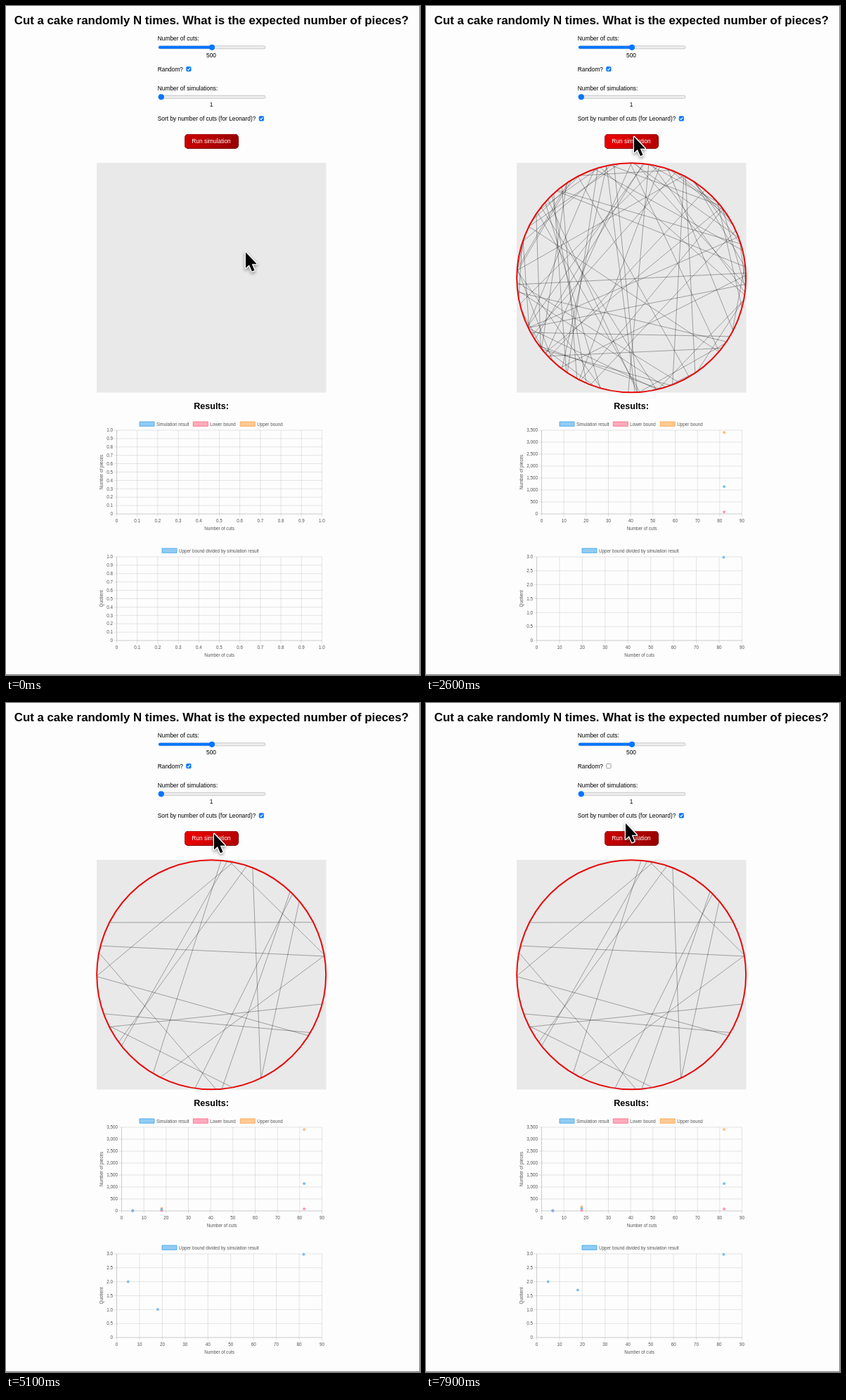
These frames come from a looping animation (589x951 px, 8 s). An HTML page with a canvas:

```html
<!DOCTYPE html>
<html lang="en">
<head>
<meta charset="utf-8">
<title>Cake cutting simulation</title>
<style>
html, body { margin: 0; width: 100%; height: 100%; overflow: hidden; background: #fdfdfd; }
canvas { display: block; }
</style>
</head>
<body>
<canvas id="stage" width="589" height="951"></canvas>
<script>
const ctx = document.getElementById('stage').getContext('2d');
const LOOP = 8000, STEP = 100;
const SANS = '"Liberation Sans", Arial, sans-serif';
const BLUE = '#0075ff';
const CAKE = { x: 292.2, y: 386.3, r: 163 };
const SERIES = {
  result: { label: 'Simulation result', line: '#36a2eb', fill: '#92ccf4' },
  lower: { label: 'Lower bound', line: '#ff6384', fill: '#ffabbc' },
  upper: { label: 'Upper bound', line: '#ff9f40', fill: '#ffca94' }
};

// Small cakes name the rim angles of their cuts in degrees; the large one is random.
const RUNS = [
  { at: 1300, cuts: 82, pieces: 1142 },
  { at: 3415, cuts: 5, pieces: 8,
    rim: '245.8-199.1 256.1-144.1 292.2-89.4 297.2-52.9 163.7-59.7' },
  { at: 4900, cuts: 18, pieces: 101,
    rim: '207.1-332.8 194.6-350.7 179.1-32.1 160.1-30.3 152.9-14.8 179.4-281 ' +
      '274.9-120.6 278-141.6 288.1-144 279.1-350 291.1-64.4 313.4-84.8 ' +
      '320.1-64.2 315.1-98.2 350.4-116.5 191.1-87.6 153.6-79.4' }
];

const REST = { x: 341, y: 350 };
const MOVES = [
  { from: 200, to: 1000, x: 296, y: 186 },
  { from: 5800, to: 6800, x: 257, y: 89 },
  { from: 7300, to: 7900, x: 284, y: 171 }
];

const clamp = v => Math.max(0, Math.min(1, v));
const smooth = p => p * p * (3 - 2 * p);
const outQuart = p => 1 - (1 - p) ** 4;

function random(seed) {
  return () => (seed = (seed * 16807) % 2147483647) / 2147483647;
}

function rimPoint(degrees) {
  const a = degrees * Math.PI / 180;
  return [CAKE.x + CAKE.r * Math.cos(a), CAKE.y + CAKE.r * Math.sin(a)];
}

const rnd = random(90210);
for (const run of RUNS) {
  const pairs = run.rim
    ? run.rim.split(' ').map(pair => pair.split('-'))
    : Array.from({ length: run.cuts }, () => [rnd() * 360, rnd() * 360]);
  run.chords = pairs.map(pair => pair.map(rimPoint));
}

function text(str, x, y, size, { align = 'left', color = '#000', bold = false } = {}) {
  ctx.font = `${bold ? 'bold ' : ''}${size}px ${SANS}`;
  ctx.textAlign = align;
  ctx.fillStyle = color;
  ctx.fillText(str, x, y);
}

function box(x, y, w, h, r, fill, stroke, width = 0.7) {
  ctx.beginPath();
  ctx.roundRect(x, y, w, h, r);
  ctx.fillStyle = fill;
  ctx.fill();
  if (!stroke) return;
  ctx.strokeStyle = stroke;
  ctx.lineWidth = width;
  ctx.stroke();
}

function line(x1, y1, x2, y2) {
  ctx.beginPath();
  ctx.moveTo(x1, y1);
  ctx.lineTo(x2, y2);
  ctx.stroke();
}

function disc(x, y, r, fill, stroke, width) {
  ctx.beginPath();
  ctx.arc(x, y, r, 0, 2 * Math.PI);
  if (fill) {
    ctx.fillStyle = fill;
    ctx.fill();
  }
  if (stroke) {
    ctx.strokeStyle = stroke;
    ctx.lineWidth = width;
    ctx.stroke();
  }
}

function slider(y, thumb) {
  box(217, y - 2, 152, 4, 2, '#efefef', '#b2b2b2');
  box(217, y - 2, thumb - 217, 4, 2, BLUE);
  disc(thumb, y, 4.1, BLUE);
}

function checkbox(x, y, checked) {
  box(x, y, 6.4, 6.4, 1.2, checked ? BLUE : '#fff', checked ? BLUE : '#767676');
  if (!checked) return;
  ctx.strokeStyle = '#fff';
  ctx.lineWidth = 1.1;
  ctx.beginPath();
  ctx.moveTo(x + 1.3, y + 3.4);
  ctx.lineTo(x + 2.7, y + 4.8);
  ctx.lineTo(x + 5.2, y + 1.5);
  ctx.stroke();
}

function button(hover, pressed) {
  const [from, to] = pressed ? ['#ee0000', '#dc0000'] : hover ? ['#f00000', '#b40000'] : ['#cc0000', '#960000'];
  const fill = ctx.createLinearGradient(254, 182, 331, 203);
  fill.addColorStop(0, from);
  fill.addColorStop(1, to);
  box(254.5, 182.5, 76, 20, 4.5, fill, '#7d0000', 1.1);
  ctx.strokeStyle = 'rgba(255,110,100,.55)';
  ctx.lineWidth = 0.7;
  line(258, 182.6, 327, 182.6);
  line(254.6, 186, 254.6, 199);
  text('Run simulation', 292, 195, 8.4, { align: 'center', color: '#fff' });
}

function drawControls(t, hover) {
  const pressed = hover && RUNS.some(run => t >= run.at - 110 && t < run.at);
  text('Cut a cake randomly N times. What is the expected number of pieces?',
    292.3, 26, 16.83, { align: 'center', bold: true });
  text('Number of cuts:', 215.7, 49, 8.4);
  slider(58.8, 293);
  text('500', 292, 73, 8.4, { align: 'center' });
  text('Random?', 215.7, 93, 8.4);
  checkbox(256.7, 86.4, t < 7000);
  text('Number of simulations:', 215.7, 119.5, 8.4);
  slider(129.3, 220.8);
  text('1', 292, 143.2, 8.4, { align: 'center' });
  text('Sort by number of cuts (for Leonard)?', 215.7, 163.2, 8.4);
  checkbox(360.2, 156.8, true);
  button(hover, pressed);
}

function drawCake(run) {
  ctx.fillStyle = '#e9e9e9';
  ctx.fillRect(129, 223, 326.5, 326.5);
  if (!run) return;
  ctx.strokeStyle = 'rgba(0,0,0,.55)';
  ctx.lineWidth = 0.6;
  for (const [a, b] of run.chords) line(...a, ...b);
  disc(CAKE.x, CAKE.y, CAKE.r, null, '#e60a0a', 2);
}

function legend(x, y, { label, line: stroke, fill }) {
  box(x, y, 21, 6.3, 0, fill, stroke, 0.8);
  text(label, x + 24, y + 5.5, 6.31, { color: '#555' });
}

// points: [x value, y value, series], given in drawing order
function chart({ left, top, yTitle, yMax, yStep, yText, xMax, xStep, xText, points }) {
  const right = 449.5, bottom = top + 119;
  const px = v => left + v / xMax * (right - left);
  const py = v => bottom - v / yMax * (bottom - top);
  const label = { color: '#555' };
  ctx.strokeStyle = 'rgba(0,0,0,.1)';
  ctx.lineWidth = 1;
  for (let i = 0; i <= Math.round(xMax / xStep); i++) {
    const x = px(i * xStep);
    line(x, top, x, bottom + 4);
    text(i ? xText(i * xStep) : '0', x, bottom + 11.5, 6.31, { ...label, align: 'center' });
  }
  for (let i = 0; i <= Math.round(yMax / yStep); i++) {
    const y = py(i * yStep);
    line(left - 4, y, right, y);
    text(i ? yText(i * yStep) : '0', left - 5.5, y + 2.2, 6.31, { ...label, align: 'right' });
  }
  line(left, top, left, bottom);
  line(left, bottom, right, bottom);
  text('Number of cuts', (left + right) / 2, bottom + 23, 6.31, { ...label, align: 'center' });
  ctx.save();
  ctx.translate(138, (top + bottom) / 2);
  ctx.rotate(-Math.PI / 2);
  text(yTitle, 0, 0, 6.31, { ...label, align: 'center' });
  ctx.restore();
  for (const [x, y, s] of points) disc(px(x), py(y), 1.45, s.fill, s.line, 0.7);
}

function drawCharts(t, runs) {
  const { result, lower, upper } = SERIES;
  const has = runs.length > 0;
  const decimal = v => v.toFixed(1);
  const whole = v => v.toLocaleString('en-US');
  const xAxis = has ? { xMax: 90, xStep: 10, xText: whole } : { xMax: 1, xStep: 0.1, xText: decimal };
  const unit = { yMax: 1, yStep: 0.1, yText: decimal };
  const grown = runs.map(({ at, cuts: n, pieces }) => {
    const k = outQuart(clamp((t - at) / 1000));
    const most = (n * n + n + 2) / 2;
    return { n, low: (n + 1) * k, mid: pieces * k, high: most * k, ratio: most / pieces * k };
  });

  text('Results:', 292, 572.7, 12.6, { align: 'center', bold: true });
  legend(190, 591, result);
  legend(266.3, 591, lower);
  legend(333.3, 591, upper);
  chart({
    left: has ? 164.5 : 157.5, top: 603, yTitle: 'Number of pieces', ...xAxis,
    ...(has ? { yMax: 3500, yStep: 500, yText: whole } : unit),
    points: [
      ...grown.map(g => [g.n, g.high, upper]),
      ...grown.map(g => [g.n, g.low, lower]),
      ...grown.map(g => [g.n, g.mid, result])
    ]
  });
  legend(222, 771, { ...result, label: 'Upper bound divided by simulation result' });
  chart({
    left: 157.5, top: 783, yTitle: 'Quotient', ...xAxis,
    ...(has ? { yMax: 3, yStep: 0.5, yText: decimal } : unit),
    points: grown.map(g => [g.n, g.ratio, result])
  });
}

function pointerAt(t) {
  let { x, y } = REST;
  for (const move of MOVES) {
    const k = smooth(clamp((t - move.from) / (move.to - move.from)));
    x += (move.x - x) * k;
    y += (move.y - y) * k;
  }
  return [x, y];
}

function drawPointer(x, y) {
  const arrow = new Path2D('M0 0V22.5L5 18L9 27.3L12.6 25.8L8.7 16.7H15.8Z');
  ctx.save();
  ctx.translate(x, y);
  ctx.lineJoin = 'round';
  ctx.lineWidth = 2.6;
  ctx.strokeStyle = '#fff';
  ctx.shadowColor = 'rgba(0,0,0,.45)';
  ctx.shadowBlur = 4;
  ctx.shadowOffsetY = 2;
  ctx.stroke(arrow);
  ctx.shadowColor = 'transparent';
  ctx.fillStyle = '#000';
  ctx.fill(arrow);
  ctx.restore();
}

function draw(now) {
  const t = Math.floor((now % LOOP) / STEP) * STEP;
  const runs = RUNS.filter(run => t >= run.at);
  const [x, y] = pointerAt(t);
  const hover = x > 254 && x < 331 && y > 182 && y < 203;
  ctx.fillStyle = '#fdfdfd';
  ctx.fillRect(0, 0, 589, 951);
  drawControls(t, hover);
  drawCake(runs[runs.length - 1]);
  drawCharts(t, runs);
  drawPointer(x, y);
  ctx.fillStyle = '#808080';
  ctx.fillRect(588, 0, 1, 951);
  ctx.fillRect(0, 950, 589, 1);
}

const start = performance.now();
function tick() {
  draw(performance.now() - start);
  requestAnimationFrame(tick);
}
tick();
</script>
</body>
</html>
```
